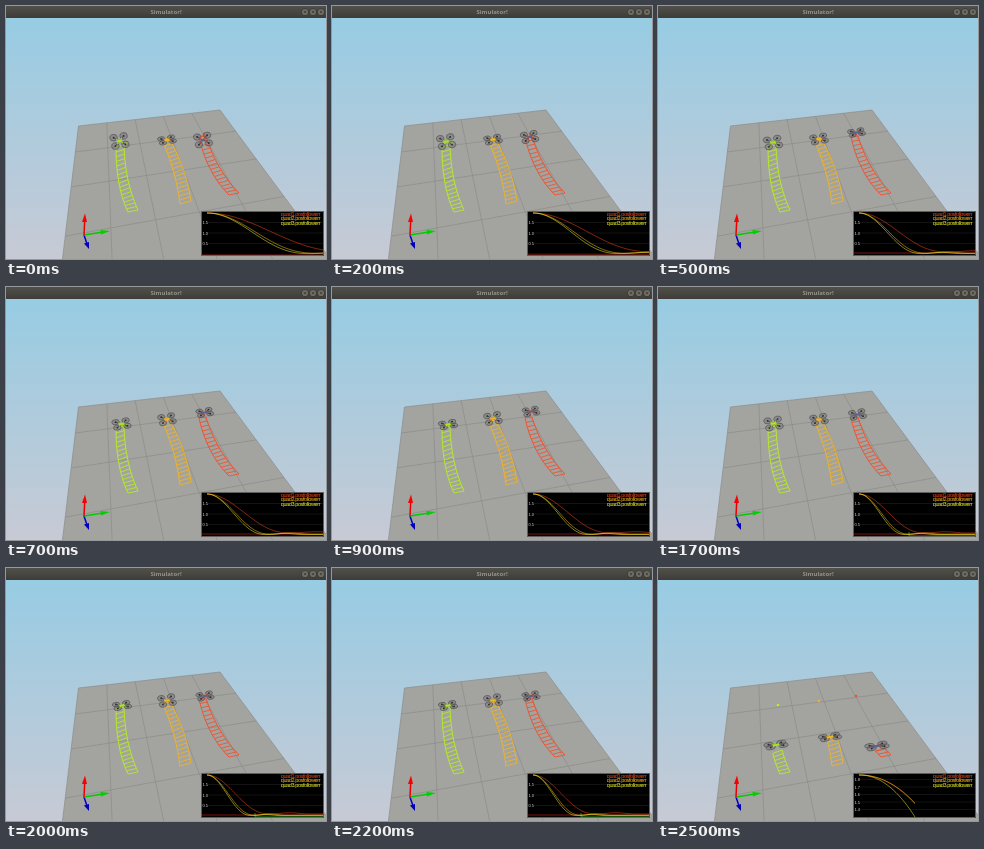
Animation of 320x253 px, one loop 2600 ms. Source, as an HTML page with a canvas:

```html
<!DOCTYPE html>
<html>
<head>
<meta charset="utf-8">
<style>
html, body { margin: 0; width: 100%; height: 100%; overflow: hidden; background: #b8cfda; }
canvas { display: block; width: 320px; height: 253px; }
</style>
</head>
<body>
<canvas id="stage" width="320" height="253"></canvas>
<script>
const ctx = document.getElementById('stage').getContext('2d');
const LOOP = 2600, STEP = 100, RESET = 2400;
const FONT = '"Liberation Sans", Arial, sans-serif';
const KEYS = [0, 500, 900, 1300, 1700, 2000];
// Horizontal position of the error minimum in the plot
const MINIMA = [303, 264, 257, 251, 248, 246];

// pose: centre x, centre y, apparent depth at each key time
const quads = [
  { color: '#b6ee24', body: '#a8e81c', curve: '#f4f828', name: 'quad3', dot: [120, 137], start: [124, 196], up: [118, 177],
    left: [122, 206, 110, 181, 110, 141], right: [132, 204, 119, 176, 118, 139], climb: 0.37, pace: 1, floor: 0.01,
    pose: [[113.5, 135, 4.2], [115, 136.5, 3.4], [116, 137.5, 2], [116, 138, 1.6], [115.5, 136.5, 3.5], [116, 137.5, 1.9]] },
  { color: '#f0b428', body: '#f0b820', curve: '#ffc020', name: 'quad2', dot: [161, 133], start: [178, 188], up: [172, 169],
    left: [174, 198, 170, 166, 157, 136], right: [185, 195, 180, 162, 164, 134], climb: 0.42, pace: 1.07, floor: 0.02,
    pose: [[161, 134, 2], [161, 133, 2.6], [161, 131.5, 3.4], [161, 133, 2.2], [161, 132.5, 2.8], [161, 132.5, 3.2]] },
  { color: '#f0522d', body: '#50649c', curve: '#f84420', name: 'quad1', dot: [198, 128], start: [226, 184], up: [219, 178],
    left: [223, 189, 201, 167, 193, 131], right: [233, 187, 210, 163, 200, 130], climb: 0.13, pace: 1.4, floor: 0.05,
    pose: [[197, 134, 3.9], [198.5, 126.5, 2], [199, 124.5, 2.4], [199, 125.5, 2.2], [199.5, 127.5, 2.7], [199, 128, 2.2]] }
];

const mix = (a, b, k) => a + (b - a) * k;

function keyed(t, values) {
  let i = 0;
  while (i < KEYS.length - 2 && t >= KEYS[i + 1]) i++;
  const k = Math.min(1, (t - KEYS[i]) / (KEYS[i + 1] - KEYS[i]));
  return mix(values[i], values[i + 1], k);
}

function path(points, color, width = 1) {
  ctx.beginPath();
  points.forEach(p => ctx.lineTo(p[0], p[1]));
  ctx.strokeStyle = color;
  ctx.lineWidth = width;
  ctx.stroke();
}

function fill(points, color) {
  ctx.beginPath();
  points.forEach(p => ctx.lineTo(p[0], p[1]));
  ctx.closePath();
  ctx.fillStyle = color;
  ctx.fill();
}

function disc(x, y, r, color) {
  ctx.beginPath();
  ctx.arc(x, y, r, 0, Math.PI * 2);
  ctx.fillStyle = color;
  ctx.fill();
}

function label(text, x, y, font, color, align = 'left') {
  ctx.font = font;
  ctx.textAlign = align;
  ctx.fillStyle = color;
  ctx.fillText(text, x, y);
}

function bar(from, to, y0, y1) {
  const g = ctx.createLinearGradient(0, y0, 0, y1);
  g.addColorStop(0, from);
  g.addColorStop(1, to);
  ctx.fillStyle = g;
  ctx.fillRect(0, y0, 320, y1 - y0);
}

function drawWindow() {
  bar('#97cce3', '#c7cad5', 12, 253);
  bar('#51504a', '#3d3c38', 0, 12);
  label('Simulator!', 160, 8, 'bold 6px "Open Sans", sans-serif', '#96938a', 'center');
  [299, 307, 315].forEach(x => {
    disc(x, 6, 3.6, '#35342f');
    disc(x, 6, 3.1, '#6e6c64');
    disc(x, 6, 1.2, '#4a4944');
  });
}

// Perspective floor: both line families meet on one horizon
function drawGround() {
  const HORIZON = -58, NEAR_X = 94, FAR_X = 1647;
  const leftX = y => 72.5 - 0.12 * (y - 120);
  fill([[72.5, 120], [214, 104], [325, 254], [leftX(254), 254]], '#a3a3a0');
  for (let i = 0; i <= 5; i++) {
    const x = mix(72.5, 214, i / 5), y = mix(120, 104, i / 5);
    const k = (254 - HORIZON) / (y - HORIZON);
    path([[x, y], [NEAR_X + (x - NEAR_X) * k, 254]], '#8c8c89', 0.7);
  }
  for (let i = 0; i < 4; i++) {
    const y = HORIZON + 1 / (1 / 178 - i * 0.000716), x = leftX(y);
    const slope = (HORIZON - y) / (FAR_X - x);
    const end = (214 + 0.74 * (y - slope * x - 104)) / (1 - 0.74 * slope);
    path([[x, y], [end, y + slope * (end - x)]], '#8c8c89', 0.7);
  }
}

function drawAxes() {
  path([[78, 229], [81, 238]], '#0000d0', 1.5);
  fill([[78, 237.5], [83, 236], [83, 243]], '#0000b8');
  path([[78, 229], [97, 226]], '#00cc00', 1.5);
  fill([[94.5, 224], [104, 225], [95, 228.5]], '#00d000');
  path([[78, 229], [78.7, 215]], '#e80000', 1.5);
  fill([[76, 216], [79, 207.5], [81, 216]], '#f80000');
}

function bend(c, k) {
  const j = 1 - k;
  return [0, 1].map(i => j * j * c[i] + 2 * j * k * c[i + 2] + k * k * c[i + 4]);
}

function drawTrail(q, reach) {
  const left = [], right = [], rungs = 16;
  for (let i = 0; i <= rungs; i++) {
    const k = Math.min(i / rungs, reach);
    left.push(bend(q.left, k));
    right.push(bend(q.right, k));
    path([left[i], right[i]], q.color, 0.85);
    if (k >= reach) break;
  }
  path(left, q.color, 0.95);
  path(right, q.color, 0.95);
}

function drawQuad(q, x, y, depth) {
  const s = 1 + (y - 135) / 150;
  const at = (i, j) => [x + s * (5 * i + 0.9 * j), y + s * (-0.9 * i + depth * j)];
  [[-1, -1], [1, -1], [-1, 1], [1, 1]].forEach(([i, j]) => {
    const [cx, cy] = at(i, j);
    ctx.beginPath();
    ctx.ellipse(cx, cy, 3.7 * s, (1.1 + depth * 0.52) * s, -0.15, 0, Math.PI * 2);
    ctx.fillStyle = 'rgba(115,115,118,0.5)';
    ctx.fill();
    ctx.strokeStyle = '#515155';
    ctx.lineWidth = 0.7;
    ctx.stroke();
    disc(cx, cy, 0.9, '#28282c');
  });
  path([at(-1, -1), at(1, 1)], '#3c3c40', 0.9);
  path([at(1, -1), at(-1, 1)], '#3c3c40', 0.9);
  path([at(-0.6, -0.6), at(0.6, 0.6)], q.color, 0.9);
  path([at(0.6, -0.6), at(-0.6, 0.6)], q.color, 0.9);
  path([at(-0.5, 0), at(0.5, 0)], q.body, 1.8);
}

// Remaining error: smooth fall, then a small damped rebound
function error(u, floor) {
  const fall = u < 1
    ? ((1 + Math.cos(Math.PI * u)) / 2) ** 1.2
    : 0.03 * Math.sin(Math.min(1, (u - 1) * 1.6) * Math.PI) ** 2;
  return mix(floor, 1, fall);
}

function drawPlot(t) {
  const fresh = t >= RESET;
  ctx.fillStyle = '#000';
  ctx.fillRect(195, 205, 123, 45);
  const ticks = fresh
    ? [['1.8', 212], ['1.7', 219.5], ['1.6', 227], ['1.5', 234.5], ['1.4', 242]]
    : [['1.5', 217], ['1.0', 227.5], ['0.5', 238]];
  ticks.forEach(([text, y]) => {
    path([[202, y - 0.5], [317, y - 0.5]], '#202020', 0.6);
    label(text, 196.4, y + 1.3, '4px ' + FONT, '#ddd');
  });

  ctx.save();
  ctx.beginPath();
  ctx.rect(195, 205, 123, 45);
  ctx.clip();
  const low = keyed(t, MINIMA);
  const zero = keyed(t, [249, 247, 247, 247, 247, 247]);
  if (!fresh) path([[196, zero], [317, zero]], '#981c14', 0.8);
  if (!fresh && t >= 1600) path([[low + 3, 245], [low + 3, 249], [317, 249]], '#20b818', 0.8);
  const end = fresh ? (t === RESET ? 234 : 257) : 317;
  ctx.globalAlpha = 0.75;
  [...quads].reverse().forEach((q, i) => {
    const line = [];
    for (let x = 201; x <= end; x++) {
      const y = fresh
        ? 207 + (i === 2 ? 42 : 29 - i) * ((x - 201) / 56) ** 2.1
        : 248 - 41 * error((x - 201) / (low - 201) / q.pace, q.floor);
      line.push([x, y]);
    }
    path(line, q.curve, 0.7);
  });
  ctx.restore();

  ctx.strokeStyle = '#777';
  ctx.lineWidth = 0.8;
  ctx.strokeRect(195.5, 205.5, 122, 44);

  ctx.letterSpacing = '-0.4px';
  [...quads].reverse().forEach((q, i) =>
    label(q.name + '.posfollowerr', 274.8, 210 + i * 4.4, '5.5px ' + FONT, q.curve));
  ctx.letterSpacing = '0px';
}

function draw(t) {
  const fresh = t >= RESET, early = t === RESET;
  drawWindow();
  drawGround();
  drawAxes();
  quads.forEach(q => {
    drawTrail(q, fresh ? q.climb * (early ? 0.3 : 1) : 1);
    disc(q.dot[0], q.dot[1], 1.3, q.color);
  });
  quads.forEach(q => {
    const [x, y, depth] = fresh
      ? [...(early ? q.start : q.up), 1.1]
      : [0, 1, 2].map(i => keyed(t, q.pose.map(p => p[i])));
    drawQuad(q, x, y, depth);
  });
  drawPlot(t);
}

const begin = performance.now();
function tick() {
  const t = (performance.now() - begin) % LOOP;
  draw(Math.floor(t / STEP) * STEP);
  requestAnimationFrame(tick);
}
tick();
</script>
</body>
</html>
```
